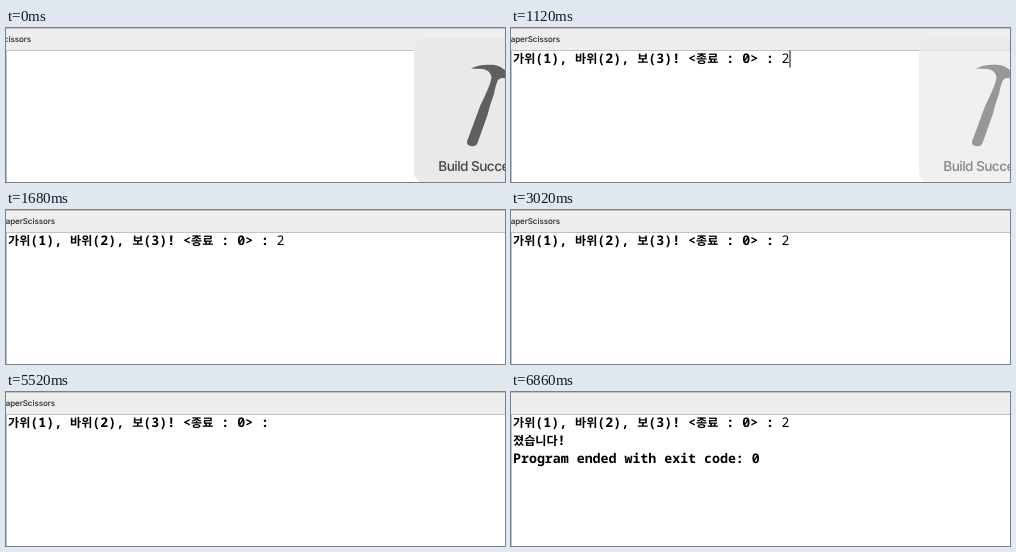
An HTML page for the animation above (7.12 s loop, 499 px wide and 154 px high).

```html
<!DOCTYPE html>
<html lang="ko">
<head>
<meta charset="utf-8">
<style>
  html, body { margin: 0; width: 100%; height: 100%; overflow: hidden; background: #fff; }
  svg { display: block; }
  text { text-rendering: geometricPrecision; white-space: pre; }
  .mono { font: 700 13.28px "Noto Sans Mono", monospace; }
  .mono .ko { font: 700 12.1px "Noto Sans CJK KR", "Noto Sans CJK", sans-serif; }
  #input { font-weight: 400; }
  .ui { font-family: Inter, sans-serif; font-weight: 500; }
</style>
</head>
<body>
<svg width="499" height="154" viewBox="0 0 499 154">
  <rect width="499" height="22" fill="#eee"/>
  <path d="M0 .5H499M0 22.5H499M.5 23V154" stroke="#c2c2c2"/>
  <text id="title" class="ui" y="14.3" font-size="8" letter-spacing="-.05" text-anchor="end" fill="#222">RockPaperScissors</text>

  <g class="mono">
    <text id="prompt" x="2" y="34.5"><tspan class="ko">가위</tspan>(1), <tspan class="ko">바위</tspan>(2), <tspan class="ko">보</tspan>(3)! &lt;<tspan class="ko">종료</tspan> : 0&gt; : </text>
    <text id="input" x="270.6" y="34.5">2</text>
    <text id="result" x="2" y="52.6"><tspan class="ko">졌습니다</tspan>!</text>
    <text id="exit" x="2" y="71">Program ended with exit code: 0</text>
  </g>
  <rect id="caret" width="1" height="17"/>

  <g id="panel">
    <rect x="408" y="10" width="146" height="145" rx="11" fill="#e9e9e9"/>
    <path fill="#5f5f5f" d="M465 40.5C470 37.5 477 36.3 485 36.7Q493 37 496 40L500 42.5V50.5Q494 48.5 491.5 53
      Q489 59 488 66L484.5 76L481.5 87L471.5 115Q470 118.5 466 118.3Q460.5 117.5 461 113.5
      L474.5 77L477 72L481.5 62Q485 54 485.5 49Q484 42 477 41Q470 40.5 465 40.5Z"/>
    <text class="ui" x="432.3" y="143" font-size="13.6" letter-spacing="-.55" fill="#454545">Build Succeeded</text>
  </g>
</svg>
<script>
  const LOOP = 7120, BLINK = 660, LEAD = 20;
  const PROMPT = 300, TYPE = 1040, ERASE = 3560, RETYPE = 5660, ENTER = 5880, NEWLINE = 6020, EXIT = 6180;
  const caretMoves = [PROMPT, TYPE, ERASE, RETYPE, NEWLINE, EXIT];

  const el = id => document.getElementById(id);
  const show = (id, on) => el(id).setAttribute("visibility", on ? "visible" : "hidden");

  // Every move restarts the blink with the caret on.
  function caretOn(t) {
    const start = caretMoves.findLast(m => m <= t);
    if (start === undefined || t >= ENTER && t < NEWLINE) return false;
    return Math.floor((t - start + LEAD) / BLINK) % 2 === 0;
  }

  function draw(t) {
    const typed = t >= TYPE && t < ERASE || t >= RETYPE;
    el("title").setAttribute("x", t < 180 ? 25 : 49);
    show("title", t < NEWLINE);
    show("prompt", t >= PROMPT);
    show("input", typed);
    show("result", t >= ENTER);
    show("exit", t >= EXIT);

    show("caret", caretOn(t));
    el("caret").setAttribute("x", t >= EXIT ? 248.5 : t >= ENTER ? 2 : typed ? 278.5 : 270.5);
    el("caret").setAttribute("y", t >= ENTER ? 58 : 22.5);

    const fade = t < 1360 ? Math.min(1, (1380 - t) / 400) : 0;
    el("panel").setAttribute("opacity", fade);
  }

  function tick() {
    draw(performance.now() % LOOP);
    requestAnimationFrame(tick);
  }
  tick();
</script>
</body>
</html>
```
